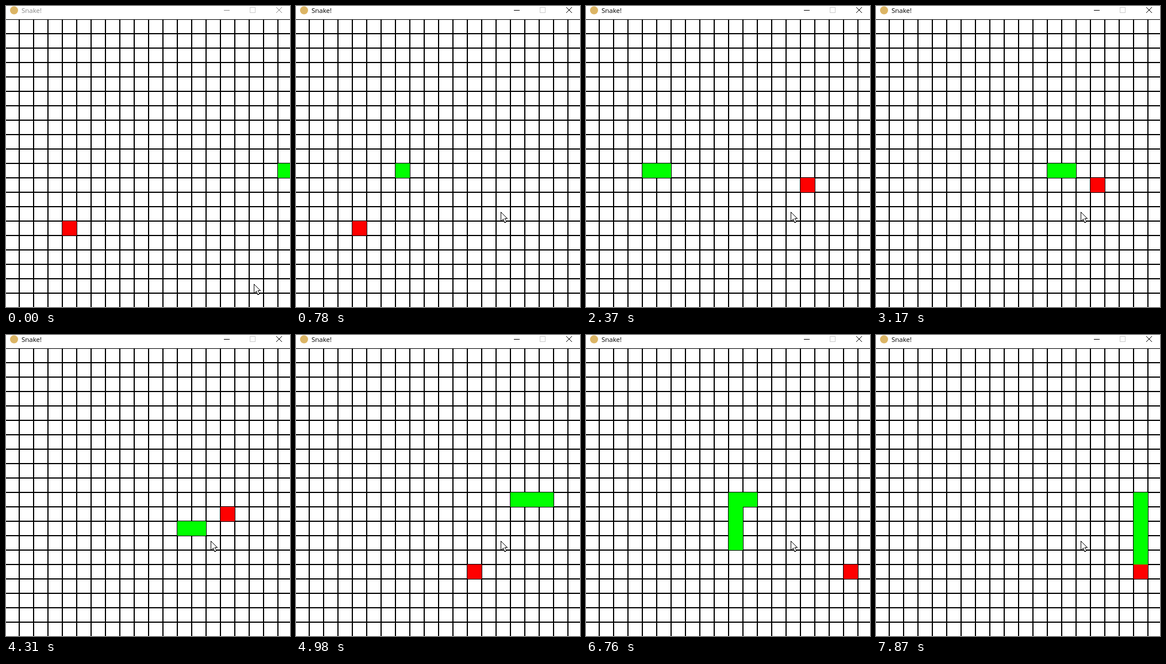
An HTML page for the animation above (8000 ms loop, 494x522 px).

```html
<!DOCTYPE html>
<html lang="en">
<head>
<meta charset="utf-8">
<title>Snake!</title>
<style>
  html, body { margin: 0; width: 100%; height: 100%; overflow: hidden; background: #fff; }
  svg { display: block; width: 494px; height: 522px; }
  text { font: 11.5px "Open Sans", "Noto Sans", sans-serif; fill: currentColor; }
  .crisp { shape-rendering: crispEdges; }
</style>
</head>
<body>
<svg viewBox="0 0 494 522">
  <path id="grid" class="crisp" stroke="#000" stroke-width="2" fill="none"/>
  <g id="cells" class="crisp"></g>
  <rect class="crisp" width="494" height="23" fill="#fff"/>
  <circle cx="14" cy="7.5" r="7" fill="#dcb565"/>
  <g id="caption" fill="none" stroke="currentColor">
    <text x="27" y="12" stroke="none">Snake!</text>
    <path d="M379 7.5h10"/>
    <path d="M470 2l10 10m0 -10l-10 10"/>
  </g>
  <rect x="424.5" y="2.5" width="9" height="9" fill="none" stroke="#ccc"/>
  <path id="cursor" class="crisp" fill="#fff" stroke="#000"
    d="M.5 .5V16.5L4.5 12.5L7 18.5H8.5L9.5 16.5L7.5 11.5H11.5Z"/>
</svg>
<script>
const LOOP = 8000, CELL = 25, SIZE = 20;
const $ = id => document.getElementById(id);

const route = "R9 D4 L5 U4 R11 D3 R2 U1 L4 U1 R3 U1 R2 D3 L2 D2 L5 U5 R8 D4";
const apples = [[4, 14], [15, 11], [12, 15], [10, 10], [18, 15]];
const dirs = { R: [1, 0], L: [-1, 0], U: [0, -1], D: [0, 1] };

// The snake moves every 1.5 screen ticks, falling half a tick behind early on
function moveTime(n) {
  const tick = Math.floor(1.5 * n + (n > 16 ? 0.5 : 0));
  return n && tick * 66.2 - 14;
}

const moveTo = (x, y) => ({ transform: `translate(${x}px, ${y}px)` });
const cellAt = ([col, row]) => moveTo(col * CELL - 2, row * CELL + 23);

// Plays [time, style] steps as hard changes unless a style sets its own easing
function play(element, steps) {
  const frames = steps.map(([t, style]) =>
    ({ easing: "step-end", ...style, offset: t / LOOP }));
  frames.push({ ...steps[steps.length - 1][1], offset: 1 });
  element.animate(frames, { duration: LOOP, iterations: Infinity });
}

function addCell(color) {
  const rect = document.createElementNS("http://www.w3.org/2000/svg", "rect");
  rect.setAttribute("width", CELL);
  rect.setAttribute("height", CELL);
  rect.setAttribute("fill", color);
  return $("cells").appendChild(rect);
}

$("grid").setAttribute("d", Array.from({ length: SIZE }, (_, i) =>
  `M${i * CELL - 2} 23V522M0 ${i * CELL + 23}H494`).join(""));

// Walk the route, growing by one segment per apple
const path = [[19, 10]], lengths = [1], appleSteps = [[0, cellAt(apples[0])]];
let eaten = 0;
for (const leg of route.split(" ")) {
  const [dx, dy] = dirs[leg[0]];
  for (let i = 0; i < +leg.slice(1); i++) {
    const [x, y] = path[path.length - 1];
    const head = [(x + dx + SIZE) % SIZE, (y + dy + SIZE) % SIZE];
    path.push(head);
    if (String(head) === String(apples[eaten])) {
      eaten++;
      appleSteps.push([moveTime(path.length - 1), cellAt(apples[eaten])]);
    }
    lengths.push(eaten + 1);
  }
}

play(addCell("#f00"), appleSteps);
// Segments not grown yet hide under the tail
for (let k = 0; k < apples.length; k++) {
  play(addCell("#0f0"), path.map((_, n) =>
    [moveTime(n), cellAt(path[n - Math.min(k, lengths[n] - 1)])]));
}

play($("cursor"), [
  [0, moveTo(431, 482)],
  [195, { ...moveTo(431, 482), easing: "steps(4)" }],
  [460, moveTo(356, 357)]
]);
play($("caption"), [[0, { color: "#888" }], [460, { color: "#000" }]]);
</script>
</body>
</html>
```
